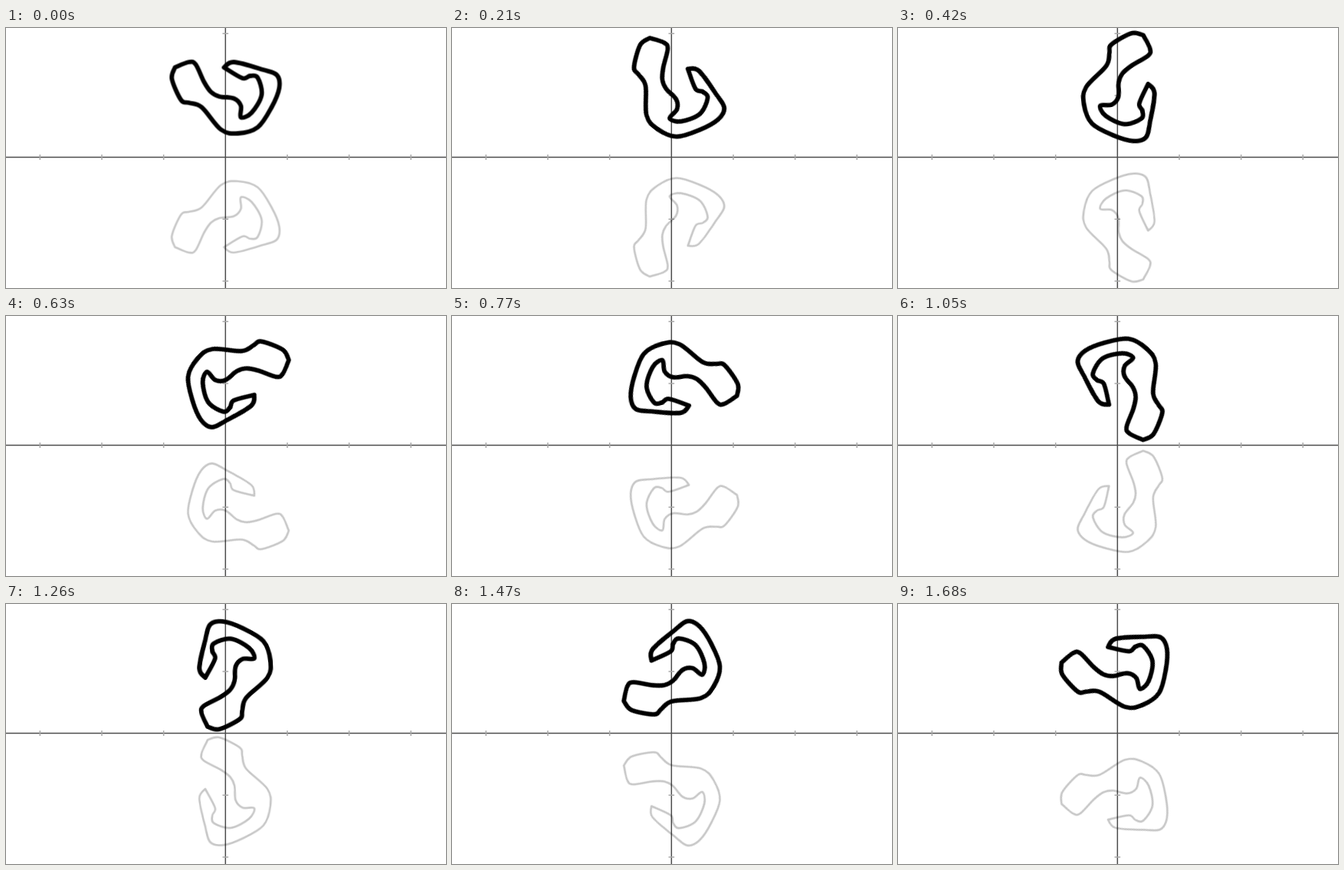
Animation, 574 px wide and 339 px high, one loop 1.75 s. Source, as an HTML page:

```html
<!DOCTYPE html>
<html lang="en">
<head>
<meta charset="utf-8">
<title>Rotating curve and its reflection</title>
<style>
html, body { margin: 0; width: 100%; height: 100%; overflow: hidden; background: #fff; }
svg { display: block; width: 574px; height: 339px; }
path { fill: none; stroke-linecap: round; stroke-linejoin: round; }
.axis { stroke: #4d4d4d; stroke-width: 1.5; }
.ticks { stroke: #a9a9a9; stroke-width: 1.5; stroke-linecap: butt; }
.curve { animation: turn 1750ms -0.5ms infinite; }
.main { stroke: #000; stroke-width: 5.8; }
.mirror { stroke: rgba(0, 0, 0, .22); stroke-width: 2.7; }
/* 25 poses per turn, at an uneven pace */
@keyframes turn {
  0%   { transform: rotate(0deg);     animation-timing-function: steps(3); }
  12%  { transform: rotate(38.9deg);  animation-timing-function: steps(3); }
  24%  { transform: rotate(84.2deg);  animation-timing-function: steps(5); }
  44%  { transform: rotate(168.3deg); animation-timing-function: steps(4); }
  60%  { transform: rotate(225.9deg); animation-timing-function: steps(3); }
  72%  { transform: rotate(267.2deg); animation-timing-function: steps(6); }
  96%  { transform: rotate(341.4deg); animation-timing-function: steps(1); }
  100% { transform: rotate(360deg); }
}
</style>
</head>
<body>
<svg viewBox="0 0 574 339">
  <path class="axis" id="axis"/>
  <path class="ticks" id="ticks"/>
  <g id="below"><path class="curve mirror"/></g>
  <g id="above"><path class="curve main"/></g>
</svg>
<script>
const UNIT = 80.65, OX = 286.3, OY = 168.6;  // axes
const CX = 293.4, CY = 85.4;                 // centre of rotation
const set = (id, name, value) => document.getElementById(id).setAttribute(name, value);

// Key points around the centre; the two sides meet in sharp corners
const outer = '-9,-34 4,-41 42,-31 60,-24 63,-7 53,18 35,44 9,52 -13,47 -38,18 -55,12 -65,8.5 -77,-19 -73,-34';
const inner = '-73,-34 -55,-41 -46,-38 -35,-15 -26,-2 -15,4 4,6.5 13,16 13,31 27,25 40,2 35,-20.5 25,-23 15,-20 -9,-34';

// Catmull-Rom spline as cubic segments
function spline(text) {
  const p = text.split(' ').map(s => s.split(',').map(Number));
  const at = i => p[Math.max(0, Math.min(p.length - 1, i))];
  const handle = (i, dir) => at(i).map((v, k) => v + dir * (at(i + 1)[k] - at(i - 1)[k]) / 6);
  return p.slice(1).map((q, i) => `C${handle(i, 1)} ${handle(i + 1, -1)} ${q}`).join('');
}

const shape = 'M' + outer.split(' ')[0] + spline(outer) + spline(inner) + 'Z';
document.querySelectorAll('.curve').forEach(c => c.setAttribute('d', shape));
set('above', 'transform', `translate(${CX} ${CY})`);
set('below', 'transform', `translate(${CX} ${2 * OY - CY}) scale(1 -1)`);

let marks = '';
for (let i = -3; i <= 3; i++) {
  if (!i) continue;
  marks += `M${OX + i * UNIT} ${OY - 3.5}v7`;
  if (Math.abs(i) < 3) marks += `M${OX - 3.8} ${OY + i * UNIT}h7.6`;
}
set('ticks', 'd', marks);
set('axis', 'd', `M0 ${OY}H574M${OX} 0V339`);
</script>
</body>
</html>
```
